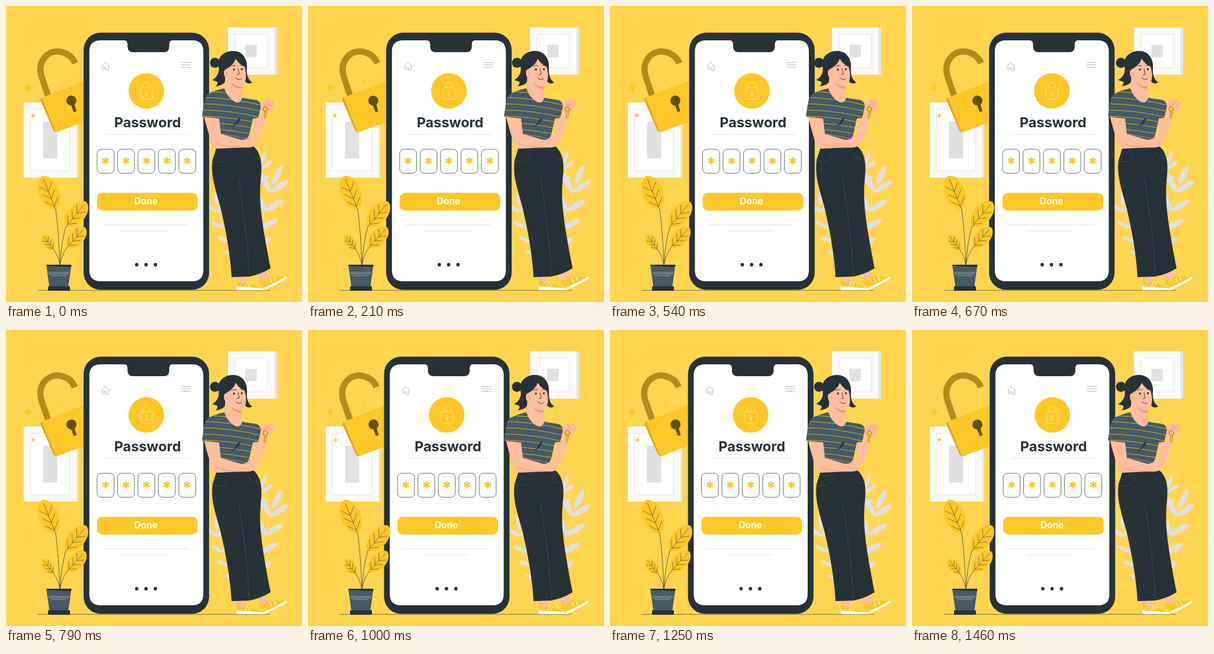
An HTML page that plays this animation: 500 by 500 pixels, repeating every 1.5 s.

```html
<!DOCTYPE html>
<html lang="en">
<head>
<meta charset="utf-8">
<title>Password screen</title>
<style>
  html, body { margin: 0; width: 100%; height: 100%; overflow: hidden; background: #ffd54f; }
  svg { display: block; width: 100%; height: 100%; }
  text { font-family: Inter, "Open Sans", sans-serif; font-weight: 700; text-anchor: middle; }
  .line { fill: none; stroke-linecap: round; stroke-linejoin: round; }
  .ink { fill: #263238; }
  .gold { fill: #ffc727; }
  .skin { fill: #ffbe9d; }
  .shirt { fill: #455a64; }
</style>
</head>
<body>
<svg viewBox="0 0 500 500">
  <clipPath id="cloth"><use href="#tee"/></clipPath>
  <g id="frames"></g>
  <path d="M53 480.300H446" stroke="#263238" stroke-width=".6"/>
  <g id="foliage" fill="#e0e0e0"></g>

  <g id="lock">
    <path fill="none" stroke="#b28b1b" stroke-width="10.500" d="M73 156L61 121C52 94 71 74 92 77.500C105 80 113 87 117 97"/>
    <path fill="#dba91f" d="M62 155L74 151 92 212 86 213Q82 213 80 209L59 160Q58 156 62 155Z"/>
    <path class="gold" d="M66 153L138 125Q143 124 145 128L165 180Q166 184 161 186L90 212Q85 214 83 209L62 158Q61 155 66 153Z"/>
    <g fill="#64500f"><circle cx="111" cy="160" r="8.500"/><path d="M109 164L115 179.500 119.500 178 115 162Z"/></g>
    <g id="stars" class="gold"></g>
  </g>

  <g id="phone">
    <rect class="ink" x="131.300" y="45" width="212" height="434.500" rx="29"/>
    <path fill="#fff" d="M160 58H200Q205 58 205.500 64V69Q206 78 215 78H267Q275.500 78 276 69V64Q276.500 58 281 58H315Q333.500 58 333.500 77V446Q333.500 465 315 465H160Q141 465 141 446V77Q141 58 160 58Z"/>
    <path class="line" stroke="#858e94" stroke-width=".6" d="M161.500 102L168 95 174.500 102M163 101V108M173.500 101V108.500H169V104H166V108M296 95.500h16m-16 4h16m-16 4h16"/>
    <circle class="gold" cx="237.300" cy="143.500" r="30"/>
    <g class="line" stroke="#ffe9a8" stroke-width=".8">
      <rect x="227.500" y="138" width="20" height="19.500" rx="2"/>
      <path d="M231.500 138V134.500a5.700 5.700 0 0 1 11.400 0V138M236.500 148l-.5 4h2.500l-.5-4"/>
      <circle cx="237.300" cy="146" r="2.200"/>
    </g>
    <text class="ink" x="239.300" y="204.500" font-size="23.500">Password</text>
    <path stroke="#e0e0e0" stroke-width=".8" d="M168 217H311M163 369.500H309M195 380H273"/>
    <g id="fields"></g>
    <rect class="gold" x="154" y="315.500" width="170" height="30" rx="9"/>
    <text x="236.600" y="335" font-size="15.500" fill="#fff">Done</text>
    <path class="line" stroke="#263238" stroke-width="5.800" d="M221 437h.01m15.800 0h.01m15.800 0h.01"/>
  </g>

  <g id="plant"></g>
  <path class="shirt" d="M68 437H110.500L105 476H73.500Z"/>
  <path class="ink" d="M68 437H110.500L110 441 69 439ZM71 473.500H108V481H71Z"/>
  <path stroke="#b9c3c8" stroke-width=".7" d="M71 450H107.500M71.500 452.500H106M76 455.500H102"/>

  <g id="woman">
    <path class="skin" d="M388 454L391 472 405 476 404 453ZM423 450L431 467 444 464 439 444Z"/>
    <path fill="#fff" d="M389 473L424 476Q436 476 438 480H390ZM436 473L472 457Q476 459 472 462L438 480Z"/>
    <path class="gold" d="M390 457.500L391 473.500 431 476.500Q420 469 407 467L397 469ZM428 461Q437 466 443 457.500L471 457.500Q463 464 437 475L428 469Z"/>
    <path class="line" stroke="#fff" stroke-width="1.200" d="M404 474l4-7m1 7l4-6m36-1l-3-7m9 4l-2-6"/>

    <path class="ink" d="M356 238L417 236.500C430 246 433 265 431 285C427 325 429 350 447 443Q431 453 411 457L381 458C379 420 371 375 361 335C351 300 346 284 349 260Z"/>
    <path class="line" stroke="#4a575d" stroke-width=".7" d="M393 292C401 345 409 401 411 456M351 262Q368 268 376 252M427 257Q416 261 411 248"/>

    <path class="skin" d="M334 184L360 188 363 214 417 219 417 190 430 189C431 181 428 174 430 166Q434 157 444 157Q455 162 452 171Q448 180 441 181C438 199 431 220 419 236Q415 240 402 239L356 241Q349 239 346 228C342 213 337 199 334 184Z"/>
    <path id="tee" class="shirt" d="M369 139Q381 153 399 155L424 159Q432 163 430 172L426 189 417 190 411 217Q408 227 397 226L363 216 360 190 331 187C334 169 334 155 341 149Q353 142 369 139Z"/>
    <g id="stripes" class="line" clip-path="url(#cloth)" stroke="#e0b63c" stroke-width=".9"></g>
    <path class="ink" d="M396 188Q394 200 379 205Q389 199 391 192Z"/>
    <path class="line" stroke="#e58b6c" stroke-width=".8" d="M363 216L392 221Q404 224 410 225M355 232Q374 240 402 239"/>

    <circle class="ink" cx="353" cy="96" r="8.500"/>
    <path class="ink" d="M359 102C356 86 369 75 385 76C402 77 408 92 407 104C406 116 409 125 416 129Q408 134 403 126L391 131 375 122Q369 134 354 136Q358 132 357 128L348 125C358 120 361 110 359 102Z"/>
    <path class="skin" d="M371 112L369 139C373 153 385 164 393 163Q398 160 399 155L398 133Z"/>
    <path fill="#ec967a" d="M379 127Q387 136 398 136L397 140Q384 139 379 127Z"/>
    <path class="skin" d="M371 107C379 103 386 96 388 89Q394 99 403 102C408 119 405 131 398 135Q388 139 378 126Q368 122 368 113Q368 108 371 107Z"/>
    <g class="line" stroke="#263238" stroke-width=".9">
      <path stroke-width="3" d="M385 107v.5M398.500 106.500v.5"/>
      <path d="M381 102Q384 99 388 101M396 100Q399 99 402 102M392 106L394 115 390.500 116M388 121Q392 126 398 123"/>
      <path stroke="#e58b6c" d="M371 112Q375 113 374 118"/>
    </g>

    <g class="line" stroke="#8a6a12">
      <circle cx="438" cy="174" r="4" fill="#ffc727" stroke-width=".9"/>
      <path stroke-width="3.500" d="M438.500 178L437.500 188"/>
      <path stroke="#ffc727" stroke-width="2" d="M438.500 177L437.500 188M439 184h2M438 188h2"/>
      <path stroke="#e58b6c" stroke-width=".7" d="M434 169Q440 163 446 169M439 161Q446 164 450 170M446 158Q451 161 452 166"/>
    </g>
  </g>
</svg>
<script>
  const $ = id => document.getElementById(id);
  const add = (id, markup) => $(id).insertAdjacentHTML('beforeend', markup);
  const rect = (x, y, w, h, style) => `<rect x="${x}" y="${y}" width="${w}" height="${h}" ${style}/>`;
  const degrees = 180 / Math.PI;

  function frame(x, y, w, h, edge, gap) {
    const inset = (d, style) => rect(x + d, y + d, w - 2 * d, h - 2 * d, style);
    add('frames', rect(x, y, w + edge, h, 'fill="#e6e6e6"') + inset(0, 'fill="#fafafa"') +
      inset(11.5, 'fill="#fff" stroke="#e6e6e6"') + inset(gap, 'fill="#e0e0e0"'));
  }
  frame(375, 36, 78, 80, 5, 29.5);
  frame(30, 163, 89, 127, 3, 32.5);

  // Leaf outline along the x axis: length n, width w
  const blade = (n, w) => `M0 0C${n * .15} ${-w / 1.5} ${n * .9} ${-w / 1.5} ${n} 0C${n * .9} ${w / 1.5} ${n * .15} ${w / 1.5} 0 0Z`;
  const place = (x, y, angle) => `transform="translate(${x} ${y}) rotate(${angle})"`;

  // Slim leaves in pairs along a quadratic curve, with one at its tip
  function branch([x0, y0], [x1, y1], [x2, y2], pairs, size) {
    const mix = (a, b, c, t) => (1 - t) ** 2 * a + 2 * t * (1 - t) * b + t * t * c;
    const slope = (a, b, c, t) => (1 - t) * (b - a) + t * (c - b);
    add('foliage', `<path class="line" stroke="#e0e0e0" d="M${x0} ${y0}Q${x1} ${y1} ${x2} ${y2}"/>`);
    const leaf = (t, turn) => {
      const angle = Math.atan2(slope(y0, y1, y2, t), slope(x0, x1, x2, t)) * degrees + turn;
      add('foliage', `<path ${place(mix(x0, x1, x2, t), mix(y0, y1, y2, t), angle)} d="${blade(size, size * .28)}"/>`);
    };
    for (let i = 1; i <= pairs; i++) {
      leaf(i / (pairs + .4), 42);
      leaf(i / (pairs + .4), -42);
    }
    leaf(1, 12);
  }
  branch([404, 440], [432, 372], [450, 302], 4, 36);
  branch([410, 320], [428, 290], [431, 268], 2, 24);
  branch([404, 440], [372, 400], [356, 338], 4, 24);

  // Broad leaf from base to tip with veins, and its stem from the pot
  function plantLeaf(x, y, tipX, tipY, w) {
    const n = Math.hypot(tipX - x, tipY - y);
    let veins = `M0 0H${n * .9}`;
    for (let t = .1; t < .7; t += .22) {
      veins += `M${n * (t + .2)} ${-w * .33}L${n * t} 0L${n * (t + .2)} ${w * .33}`;
    }
    add('plant', `<g ${place(x, y, Math.atan2(tipY - y, tipX - x) * degrees)}>
      <path class="gold" d="${blade(n, w)}"/>
      <path class="line" stroke="#4a4632" stroke-width=".6" d="${veins}"/></g>
      <path class="line" stroke="#4a4632" stroke-width=".8"
        d="M91 438Q${91 + (x - 91) * .25} ${y + (438 - y) * .4} ${x} ${y}"/>`);
  }
  plantLeaf(84, 344, 61, 287, 34);
  plantLeaf(101, 373, 136, 331, 30);
  plantLeaf(103, 408, 134, 374, 26);
  plantLeaf(81, 412, 62, 387, 18);

  function star(x, y, r) {
    add('stars', `<path ${place(x, y, -8)} d="M0 ${-r}Q${r * .2} ${-r * .2} ${r} 0Q${r * .2} ${r * .2} 0 ${r}Q${-r * .2} ${r * .2} ${-r} 0Q${-r * .2} ${-r * .2} 0 ${-r}Z"/>`);
  }
  star(46.5, 185.5, 4.5);
  star(38, 138.5, 8);
  star(94.5, 128, 3);

  for (let i = 0; i < 5; i++) {
    add('fields', `<g ${place(168.4 + i * 34.5, 262.3, 0)}>
      ${rect(-14.3, -20.3, 28.6, 40.5, 'rx="7" fill="#fff" stroke="#263238" stroke-width=".7"')}
      <path stroke="#ffc727" stroke-width="2.700" d="M0-6.800V5.200M-5.200-3.800L5.200 2.200M-5.200 2.200L5.200-3.800"/></g>`);
  }

  for (let i = 0; i < 7; i++) add('stripes', `<path d="M328 ${144 + i * 10.5}q50 0 108 14"/>`);

  const LOOP = 1500, STEPS = 36;

  // Alternating jolts at every tenth of the loop, doubling up to 4px and fading again
  function jolt(i) {
    const d = Math.min(i, 10 - i);
    return d > 0 ? (-1) ** i * Math.min(4, 2 ** (d - 1)) : 0;
  }

  function shake(p) {
    const i = Math.floor(p * 10);
    return jolt(i) + (jolt(i + 1) - jolt(i)) * (p * 10 - i);
  }

  // Triangle wave between -1 and 1 degree
  const sway = p => Math.asin(Math.sin(2 * Math.PI * p)) * 2 / Math.PI;

  function draw(now) {
    const step = Math.floor((now % LOOP) * STEPS / LOOP + .12) % STEPS;
    const p = (step + .7) / STEPS;
    $('phone').setAttribute('transform', `translate(${shake(p)} 0)`);
    $('lock').setAttribute('transform', `translate(-.5 -.3) rotate(${sway(p)} 95 142)`);
  }

  const start = performance.now();
  function tick() {
    draw(performance.now() - start);
    requestAnimationFrame(tick);
  }
  draw(0);
  requestAnimationFrame(tick);
</script>
</body>
</html>
```
